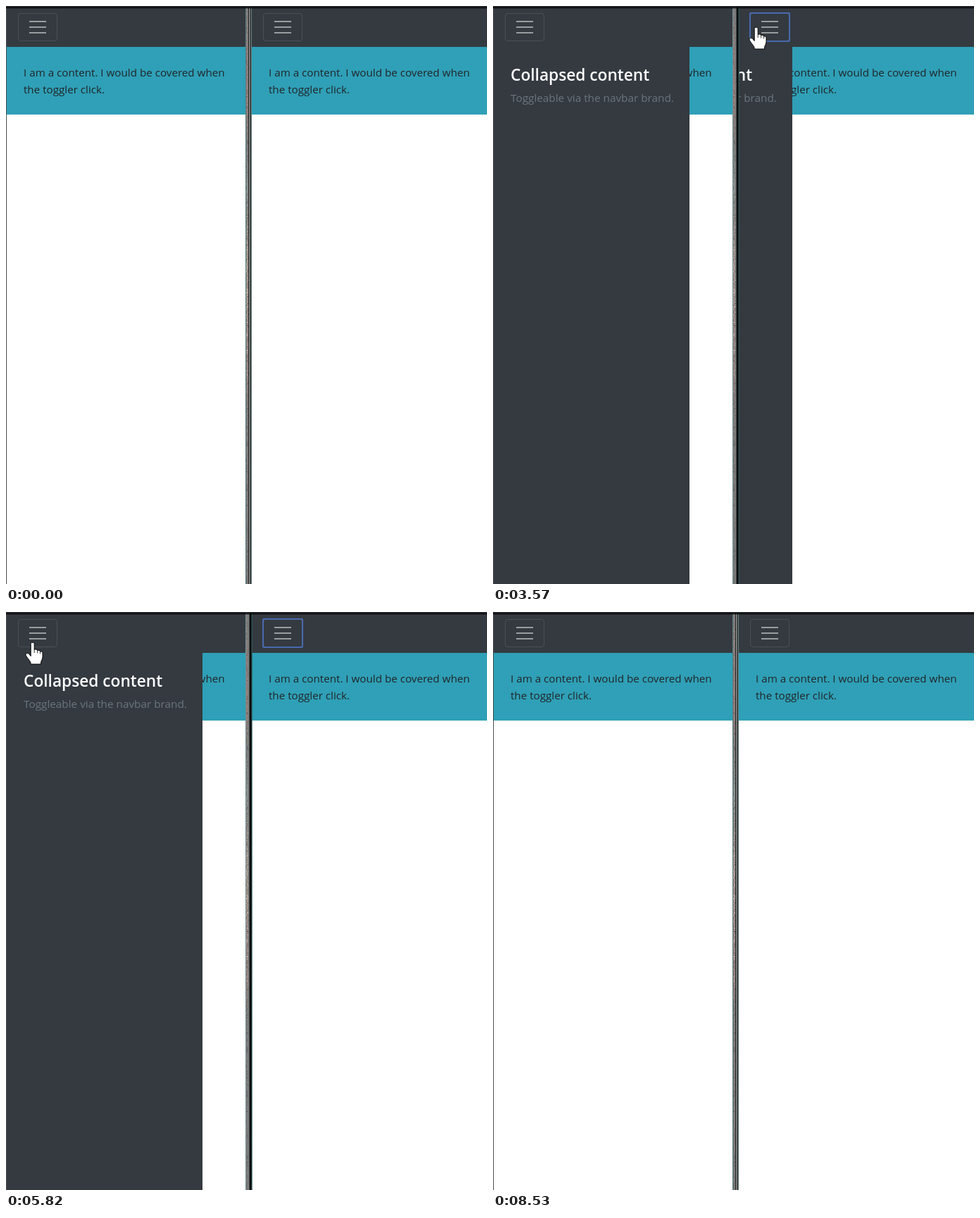
Recreate the animation shown at these times as an HTML page. Size 683 by 820 pixels, loop 8630 ms.

```html
<!DOCTYPE html>
<html lang="en">
<head>
<meta charset="utf-8">
<title>Offcanvas navbar comparison</title>
<style>
  html, body { margin: 0; width: 100%; height: 100%; overflow: hidden; background: #fff; }
  svg { display: block; width: 683px; height: 820px; }
  text { font: 15.2px "Open Sans", "Noto Sans", sans-serif; fill: #212529; }
  .title { font-size: 22.7px; font-weight: 600; fill: #fff; }
  .muted { font-size: 15.3px; fill: #6c757d; }
  .dark { fill: #343a40; }
  .cursor { fill: #fff; stroke: #000; stroke-linejoin: round; }
</style>
</head>
<body>
<svg id="stage" viewBox="0 0 683 820">
  <defs>
    <clipPath id="clipLeft"><rect width="340" height="820"/></clipPath>
    <clipPath id="clipRight"><rect x="348" width="335" height="820"/></clipPath>
    <linearGradient id="photo" x2="0" y2="1">
      <stop offset="0" stop-color="#25232a"/>
      <stop offset=".16" stop-color="#70302f"/>
      <stop offset=".24" stop-color="#1c2029"/>
      <stop offset=".32" stop-color="#527478"/>
      <stop offset=".37" stop-color="#3c3230"/>
      <stop offset=".44" stop-color="#a5836a"/>
      <stop offset=".54" stop-color="#7b4038"/>
      <stop offset=".64" stop-color="#663430"/>
      <stop offset=".7" stop-color="#24222c"/>
      <stop offset=".84" stop-color="#251c28"/>
      <stop offset="1" stop-color="#101d25"/>
    </linearGradient>
    <g id="page">
      <rect width="340" height="820" fill="#fff"/>
      <rect y="58" width="340" height="96" fill="#2fa0b7"/>
      <text x="24" y="100">I am a content. I would be covered when</text>
      <text x="24" y="124">the toggler click.</text>
    </g>
    <g id="panel">
      <rect class="dark" y="58" width="278" height="762"/>
      <text class="title" x="24" y="105.5">Collapsed content</text>
      <text class="muted" x="24" y="136">Toggleable via the navbar brand.</text>
    </g>
    <g id="navbar" fill="none">
      <rect class="dark" width="340" height="58"/>
      <rect x="16.5" y="10.5" width="55" height="39" rx="3.5" stroke="#fff" stroke-opacity=".11"/>
      <path d="M32 22h24M32 30h24M32 38h24" stroke="#fff" stroke-opacity=".5" stroke-width="2"/>
    </g>
    <rect id="ring" x="16" y="10" width="56" height="40" rx="1" fill="none" stroke="#4a69ad" stroke-width="2"/>
  </defs>

  <g clip-path="url(#clipLeft)">
    <g transform="translate(1)">
      <use href="#page"/><use id="panelL" href="#panel"/><use href="#navbar"/><use id="ringL" href="#ring"/>
    </g>
  </g>
  <g clip-path="url(#clipRight)">
    <g transform="translate(349)">
      <use href="#page"/><use id="panelR" href="#panel"/><use href="#navbar"/><use id="ringR" href="#ring"/>
    </g>
  </g>
  <rect id="edge" height="820"/>
  <rect x="340" width="9" height="820" fill="#333"/>
  <rect x="341" width="3" height="820" fill="url(#photo)"/>
  <g id="frame"></g>
  <path id="dust" stroke="#fff0e6" stroke-opacity=".5"/>
  <path id="grain" stroke="#000" stroke-opacity=".25"/>
  <rect width="683" height="1.5" fill="#292c30"/>
  <rect y="1.5" width="683" height="1.8" fill="#08090a"/>

  <path id="arrow" class="cursor" d="M0 0V26L5.8 20.6 9.8 29.6 13.8 28 10 19.2H18.5Z"/>
  <g id="hand" class="cursor">
    <path d="M-2.8 1.5C-2.8-1.6 2.2-1.6 2.2 1.5V9.5C4 8.6 6 9 6.6 10.6 8.5 9.8 10 10.4 10.6 12 12.6 11.4 14 12.6 14 14.6V20C14 23 11.6 25.5 11.6 27.6V30H-3V27.6C-4 25-8.4 20.5-9.8 17.4-10.8 14.6-7 13.4-5.2 15.6L-2.8 18.6Z"/>
    <path d="M2.2 9.5V14M6.6 10.6V14.5M10.6 12V15.5" stroke-width=".8"/>
  </g>
</svg>
<script>
const LOOP = 8630, PANEL = 278, SLIDE = 350;
const $ = id => document.getElementById(id);

// Screen updates: first time, last time, number of updates
const bursts = [
  [70, 590, 8], [740, 1530, 11], [1700, 2180, 7], [2710, 3240, 8],
  [3410, 3410, 1], [3570, 3880, 5], [4100, 4340, 4], [4890, 5720, 12],
  [5820, 5820, 1], [6180, 6580, 6], [6890, 7750, 12], [8530, 8530, 1]
];

// Pointer tip: time, x, y
const path = [
  [70, 548, 792], [330, 285, 490], [590, 115, 305], [740, 126, 292],
  [1150, 88, 140], [1530, 56, 41], [2640, 56, 41], [2950, 215, 25],
  [3240, 374, 31], [4020, 374, 31], [4340, 390, 37], [5230, 390, 37],
  [5500, 195, 18], [5720, 41, 42], [5820, 38, 44], [6810, 38, 44],
  [6890, 67, 60], [7750, 568, 835]
];

// Stripes of the window borders: x, width, colour, opacity
const frames = {
  idle: [[340, 1, '#557c7e', 1], [341, 3, '#a09c9a', .75], [344, 1, '#202223', 1],
    [345, 1, '#8b8987', 1], [346, 1, '#686b6b', 1], [347, 1, '#242828', 1], [348, 1, '#6a8583', 1]],
  left: [[340, 1, '#30373a', 1], [344, 1, '#8a8c8c', 1], [345, 2, '#35393a', 1],
    [347, 1, '#6d7f7e', 1], [348, 1, '#3d4c4c', 1]],
  right: [[340, 1, '#6f9092', 1], [341, 3, '#a09c9a', .75], [344, 1, '#77797a', 1],
    [345, 1, '#4b4d4e', 1], [346, 2, '#090b0c', 1], [348, 1, '#1c302f', 1], [349, 1, '#2d5d59', .7]]
};

function speckle(seed, count, pickY) {
  const rnd = () => (seed = seed * 16807 % 2147483647) / 2147483647;
  let d = '';
  for (let i = 0; i < count; i++) {
    d += `M${341 + Math.floor(rnd() * 3)} ${pickY(rnd).toFixed(1)}h1`;
  }
  return d;
}

function snap(t) {
  let held = 0;
  for (const [from, to, n] of bursts) {
    if (t < from) break;
    const gap = n > 1 ? (to - from) / (n - 1) : 0;
    const k = gap ? Math.min(n - 1, Math.floor((t - from) / gap + .15)) : 0;
    held = from + k * gap;
  }
  return held;
}

// CSS "ease": cubic-bezier(.25, .1, .25, 1)
function ease(p) {
  if (p <= 0) return 0;
  if (p >= 1) return 1;
  let lo = 0, hi = 1, s;
  for (let i = 0; i < 20; i++) {
    s = (lo + hi) / 2;
    const x = .75 * s * (1 - s) + s ** 3;
    if (x < p) lo = s; else hi = s;
  }
  return .3 * s * (1 - s) ** 2 + 3 * s * s * (1 - s) + s ** 3;
}

function slide(el, t, open, close) {
  const shown = ease((t - open) / SLIDE) - ease((t - close) / SLIDE);
  el.setAttribute('x', Math.round((shown - 1) * PANEL));
  show(el, shown > 0);
}

function show(el, on) {
  el.setAttribute('visibility', on ? 'visible' : 'hidden');
}

function pointer(t) {
  if (t < path[0][0] || t >= path[path.length - 1][0]) return null;
  const i = path.findIndex(p => p[0] > t);
  const [t0, x0, y0] = path[i - 1], [t1, x1, y1] = path[i];
  const p = (t - t0) / (t1 - t0);
  return [x0 + (x1 - x0) * p, y0 + (y1 - y0) * p];
}

const overToggler = ([x, y]) =>
  y > 9 && y < 51 && ((x > 16 && x < 74) || (x > 364 && x < 423));

let current = '';
function setFocus(name) {
  if (name === current) return;
  current = name;
  show($('ringL'), name === 'left');
  show($('ringR'), name === 'right');
  $('edge').setAttribute('width', name === 'left' ? 1.6 : 1);
  $('edge').setAttribute('fill', name === 'left' ? '#2b2e31' : '#4a4e52');
  $('frame').innerHTML = frames[name].map(([x, w, fill, o]) =>
    `<rect x="${x}" width="${w}" height="820" fill="${fill}" opacity="${o}"/>`).join('');
}

function focusAt(t) {
  if (t < 1700 || t >= 8530) return 'idle';
  return t >= 3410 && t < 6180 ? 'right' : 'left';
}

function draw(time) {
  const t = snap(time % LOOP);
  setFocus(focusAt(t));
  slide($('panelL'), t, 1793, 6227);
  slide($('panelR'), t, 3503.4, 4899.1);
  const tip = pointer(t);
  const hand = tip && overToggler(tip);
  show($('hand'), hand);
  show($('arrow'), tip && !hand);
  if (tip) {
    const move = `translate(${Math.round(tip[0])} ${Math.round(tip[1])})`;
    $('hand').setAttribute('transform', move);
    $('arrow').setAttribute('transform', move);
  }
}

$('dust').setAttribute('d', speckle(7, 130, rnd => 250 + (rnd() + rnd()) * 150));
$('grain').setAttribute('d', speckle(23, 380, rnd => rnd() * 820));

function tick() {
  draw(performance.now());
  requestAnimationFrame(tick);
}
tick();
</script>
</body>
</html>
```
